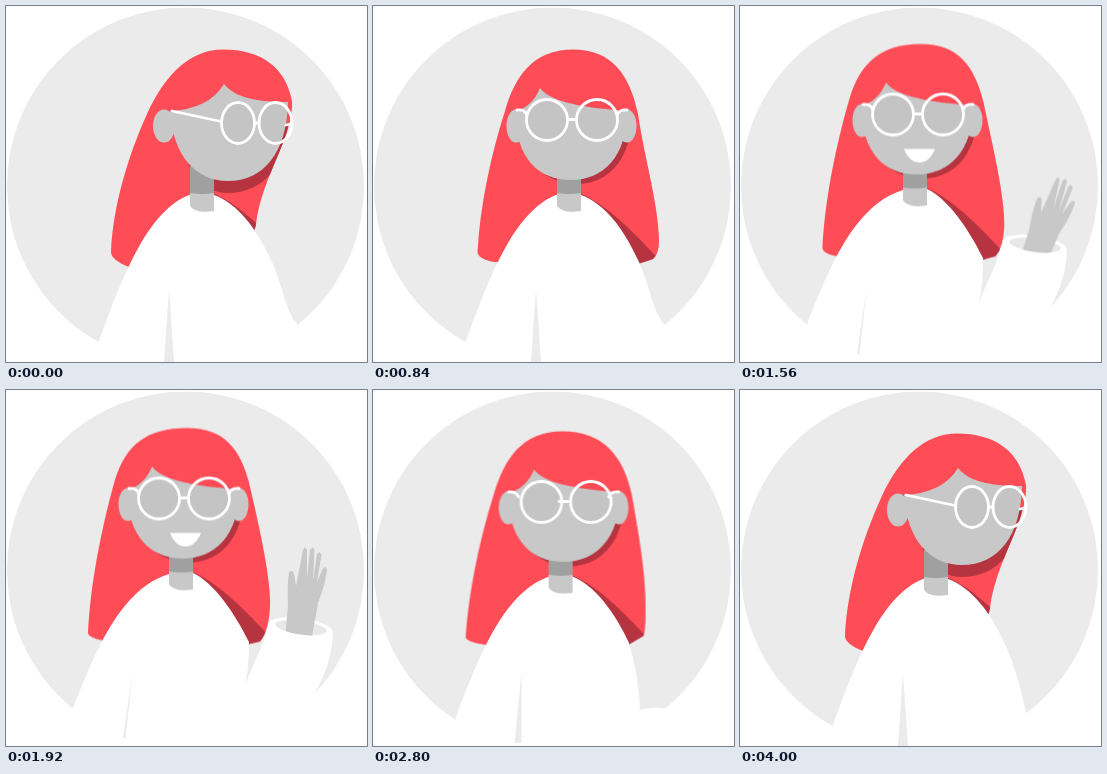
Animation of 361 by 356 pixels, one loop 4280 ms. Source, as an HTML page:

```html
<!DOCTYPE html>
<html lang="en">
<head>
<meta charset="utf-8">
<title>Waving woman</title>
<style>
html, body { margin: 0; width: 100%; height: 100%; overflow: hidden; background: #fff; }
svg { display: block; width: 100%; height: 100%; }

svg * { animation: 4280ms ease-in-out infinite; }
.red { fill: #ff4d57; }
.dark { fill: #b5343f; }
.skin { fill: #c8c8c8; }
.white { fill: #fff; }
.wire { fill: none; stroke: #fff; stroke-width: 2.8; stroke-linecap: round; }
.lens { fill: rgba(0, 0, 0, .015); }

/* --t is the turned shape, --f the one facing front */
.morph { animation-name: morph; d: var(--t); }
@keyframes morph {
  0%, .93%, 75.7%, to { d: var(--t); }
  8.41%, 63.55% { d: var(--f); }
}
.slide { animation-name: slide; }
@keyframes slide {
  0%, .93%, 75.7%, to { cx: var(--t); rx: var(--tr); }
  8.41%, 63.55% { cx: var(--f); rx: var(--fr); }
}
.face {
  --t: path("M164 105 Q203 103 218 78 C229 92 252 96 282 96 C281 146 258 175 222 175 C190 175 167 150 164 105Z");
  --f: path("M142 106 Q160 100 167 82 C176 94 200 101 254 105 C254 151 230 174 198 174 C165 174 143 152 142 106Z");
}
.jaw {
  --t: path("M176 118 H282 C281 158 258 187 222 187 C192 187 176 160 176 118Z");
  --f: path("M150 118 H258 C256 155 234 178 204 178 C172 178 150 155 150 118Z");
}
.temples {
  --t: path("M166 102 L215 112.5 M249 114 L253 114 M285 115 L280 116");
  --f: path("M144 104 Q151 103 154 109 M194.5 113.5 L203.5 113.5 M254 104 Q247 103 244 109");
}
.glasses { animation-name: drop; }
@keyframes drop {
  0%, .93%, 75.7%, to { transform: translateY(3px); }
  8.41%, 63.55% { transform: none; }
}

.head { animation-name: lean; }
@keyframes lean {
  0%, 26.17%, 69.16%, to { transform: none; }
  35.51%, 60.75% { transform: translate(-21px, -5.5px); }
}

.hair {
  animation-name: hair;
  --turned: path("M105 246 C107 200 122 150 141 108 C160 66 186 43.5 217 43.5 C256 43.5 280 62 286 95 C288 130 256 170 250 218 Q249 224 247 226 L210 240 L123 261 Q105 254 105 246Z");
  --swung: path("M112 244 C114 200 126 150 142 108 C160 66 186 43.5 217 43.5 C256 43.5 280 62 286 95 C288 130 263 170 257 220 Q256 227 253 230 L210 240 L127 259 Q112 252 112 244Z");
  --back: path("M96 244 C99 205 108 158 122 113 C134 68 155 43.5 196 43.5 C240 43.5 262 70 268 106 C272 135 271 170 268 200 Q266 235 264 251 L210 260 L122 261 Q97 253 96 244Z");
  --front: path("M104.5 246 C107 200 118 148 132 105 C142 70 160 43.5 200 43.5 C240 43.5 257 70 265 108 C271 150 286 200 286 235 Q286 248 280 253 L262 259 L121 256 Q105 253 104.5 246Z");
  --wave: path("M103 248 C105 202 116 145 130 95 C141 60 162 43.5 202 43.5 C240 43.5 255 65 264 98 C275 145 286 195 285 222 Q284 246 275 257 L262 260 L118 256 Q103 253 103 248Z");
  --lag: path("M101 249 C104 205 114 155 129 107 C140 70 158 43.5 198 43.5 C240 43.5 259 70 267 106 C274 145 282 190 281 225 Q281 243 279 248 L262 258 L121 257 Q101 254 101 249Z");
  d: var(--turned);
}
@keyframes hair {
  0%, .93%, 84.11%, to { d: var(--turned); }
  8.41%, 11% { d: var(--back); }
  19.63%, 30.5% { d: var(--front); }
  40%, 60.75% { d: var(--wave); }
  65.42% { d: var(--lag); }
  75.7% { d: var(--swung); }
}

.body {
  animation-name: body;
  --open: path("M93 335 C115 275 140 206 183 189 L208 189 C232 198 250 222 264 252 C277 278 278 302 291 318 L292 400 L80 400Z");
  --close: path("M93 335 C115 275 140 206 183 189 L208 189 C232 198 250 222 264 252 C275 275 281 300 286 323 L286 400 L80 400Z");
  --lean: path("M67 318 C85 275 110 200 163 184 L187 183 C208 193 228 222 243 252 C243 270 242 285 238 300 L238 400 L54 400Z");
  d: var(--open);
}
@keyframes body {
  0%, 26.17% { d: var(--open); }
  35.51%, 60.75% { d: var(--lean); }
  69.16%, to { d: var(--close); }
}
.fold {
  animation-name: fold;
  fill: #ebebeb;
  --up: path("M163 283 L158 356 L168 356Z");
  d: var(--up);
}
@keyframes fold {
  0%, 26.17%, 69.16%, to { d: var(--up); }
  35.51%, 60.75% { d: path("M127 280 L117 348 L119.5 348Z"); }
}

.mouth { animation-name: smile; transform-origin: 200.5px 150px; }
@keyframes smile {
  0%, 26.17%, 64.49%, to { transform: scale(0); }
  28.97%, 60.75% { transform: none; }
}

.arm { animation-name: arm; }
@keyframes arm {
  0%, 26.17%, 67.76%, to { transform: translateY(110px); }
  37.38%, 59.81% { transform: none; }
}
.inner { animation-name: inner; }
@keyframes inner {
  0%, 29.91%, 65.2%, to { opacity: 0; }
  31.78%, 63.55% { opacity: 1; }
}
.hand { animation-name: wave; transform-origin: 293px 246px; }
@keyframes wave {
  0%, 29.91% { transform: translateY(90px) rotate(0deg); }
  38.32% { transform: translateY(0) rotate(14deg); }
  44.86% { transform: translateY(0) rotate(0deg); }
  50.47% { transform: translateY(0) rotate(14deg); }
  57.94% { transform: translateY(0) rotate(2deg); }
  61.68% { transform: translateY(15px) rotate(26deg); }
  65.2%, to { transform: translateY(100px) rotate(10deg); }
}
</style>
</head>
<body>
<svg viewBox="0 0 361 356">
  <defs>
    <clipPath id="inHair"><path class="hair"/></clipPath>
  </defs>

  <circle cx="179.5" cy="180" r="178.5" fill="#ebebeb"/>

  <g class="head">
    <path class="hair red"/>
    <g clip-path="url(#inHair)">
      <path class="jaw morph dark"/>
      <path class="dark" d="M208 188 C228 196 250 214 290 258 L270 275 L200 262Z"/>
    </g>
  </g>

  <path class="body white"/>
  <path class="fold"/>

  <g class="arm">
    <ellipse class="white" cx="295" cy="238" rx="32" ry="10" transform="rotate(8 295 238)"/>
    <g class="inner">
      <ellipse cx="295" cy="238" rx="26" ry="7" fill="#e8e8e8" transform="rotate(8 295 238)"/>
      <path class="hand skin" d="M279 252 L282 215 Q281 195 283 183 Q286 178 288 184 L290 196 L297 160 Q299 155 301 160 L301 188 L304 160 Q307 155 308.5 160 L307 190 L311 164 Q314 160 315.5 165 L311 192 L316 180 Q320 174 321 180 C319 195 315 205 312 213 L305 252Z"/>
    </g>
    <path class="white" d="M269.3 234.4 A26 7 8 0 0 320.7 241.6 L327 243 C326 268 318 290 302 314 L300 420 L236 420 L238 298 C246 275 257 258 263 233Z"/>
  </g>

  <g class="head">
    <path class="skin" d="M184 160 H208 V205 Q190 208 184 200Z"/>
    <path fill="#a0a0a0" d="M184 160 H208 V187 Q196 189 184 187Z"/>
    <ellipse class="slide skin" cy="120" ry="16.5" style="--t:158px;--f:143px;--tr:11px;--fr:9.5px"/>
    <ellipse class="slide skin" cy="120" ry="16.5" style="--t:262px;--f:254px;--tr:8px;--fr:9.5px"/>
    <path class="face morph skin"/>
    <path class="mouth white" d="M185 148.5 H216 C213 156 208 162 200.5 162 C193 162 188 156 185 148.5Z"/>
    <g class="glasses">
      <ellipse class="slide wire lens" cy="114" ry="20.5" style="--t:232px;--f:174px;--tr:16.5px;--fr:20.5px"/>
      <ellipse class="slide wire lens" cy="114" ry="20.5" style="--t:269.5px;--f:224px;--tr:16.5px;--fr:20.5px"/>
      <path class="temples morph wire"/>
    </g>
  </g>
</svg>
</body>
</html>
```
